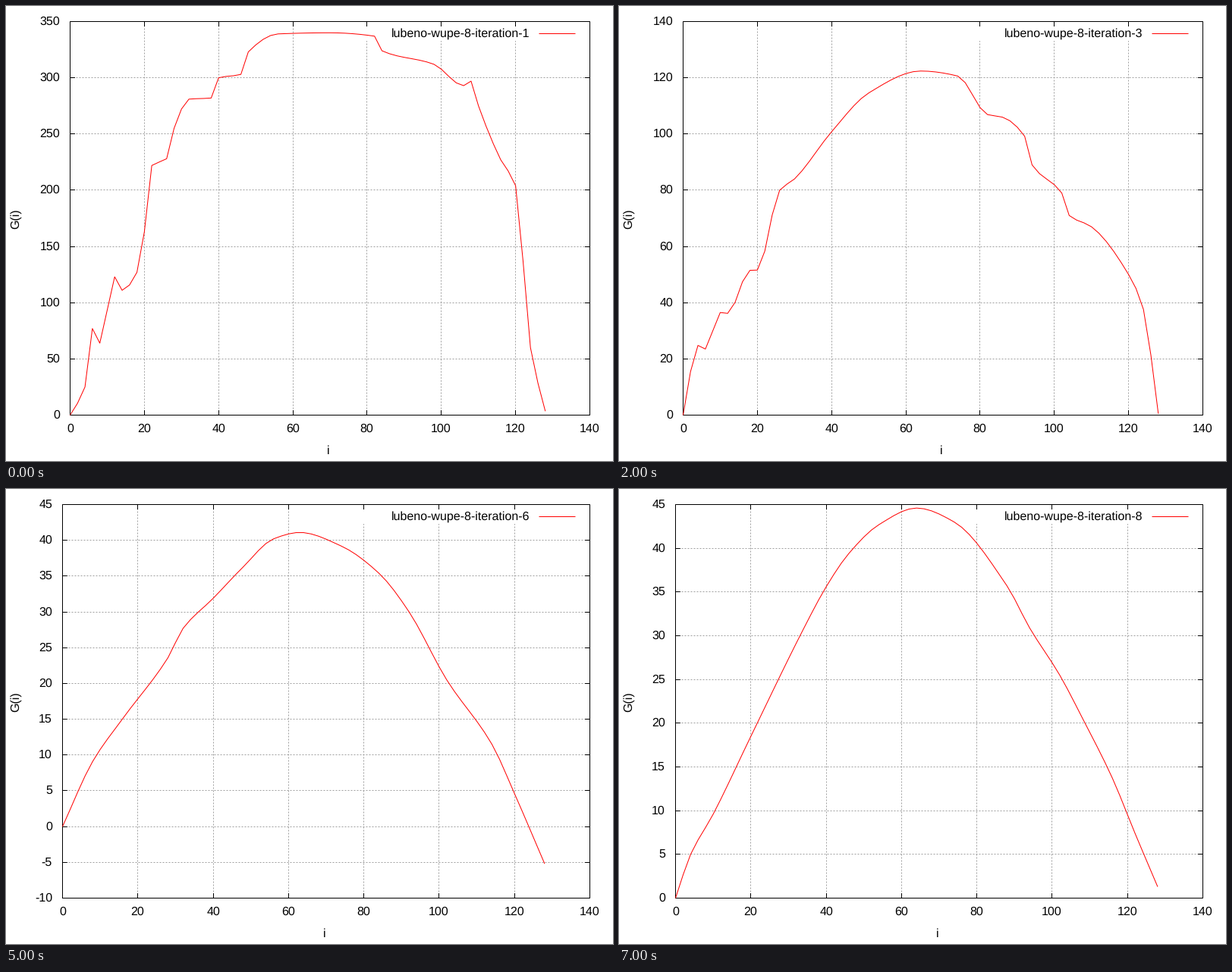
A matplotlib script for the animation above (8 s loop, 800 px wide and 600 px high).

```python
import math

import matplotlib.pyplot as plt
import numpy as np
from matplotlib.animation import FuncAnimation
from matplotlib.patches import Rectangle

plt.rcParams["font.family"] = "Liberation Sans"
plt.rcParams["text.hinting"] = "none"

PX = 0.72                      # points per pixel at 100 dpi
TOP, BOTTOM, RIGHT = 20, 539, 769
TICK = 6
STEPS = np.arange(0, 129, 2)


def curve(*points):
    """Monotone cubic through the key points, sampled at every second i."""
    x, y = np.array(points, float).T
    h = np.diff(x)
    d = np.diff(y) / h
    inner = 2 * np.maximum(d[:-1] * d[1:], 0) / (d[:-1] + d[1:] + 1e-12)
    m = np.concatenate([d[:1], inner, d[-1:]])
    k = np.clip(np.searchsorted(x, STEPS, "right") - 1, 0, len(h) - 1)
    t = (STEPS - x[k]) / h[k]
    bend = (1 - t) * (m[k] - d[k]) - t * (m[k + 1] - d[k])
    return y[k] + h[k] * t * (d[k] + (1 - t) * bend)


first = curve(
    (0, 0), (4, 25), (6, 77), (8, 64), (12, 123), (14, 111), (18, 127),
    (20, 163), (22, 222), (26, 228), (28, 255), (32, 281), (38, 282),
    (40, 300), (46, 303), (48, 323), (56, 339), (70, 340), (82, 337),
    (84, 324), (98, 312), (106, 293), (108, 297), (110, 275), (116, 227),
    (120, 204), (124, 60), (128, 3.5))
third = curve(
    (0, 0), (4, 24.8), (6, 23.5), (10, 36.5), (12, 36.2), (18, 51.5),
    (20, 51.6), (26, 80), (30, 84), (40, 100.8), (50, 114.6), (64, 122.4),
    (74, 120.6), (82, 106.9), (86, 106), (92, 99.2), (94, 89), (102, 79),
    (104, 71), (110, 67), (120, 50), (124, 37.6), (128, 0.5))
fourth = curve(
    (0, 0), (4, 7.1), (6, 7.1), (16, 22), (22, 31.5), (24, 40.3), (34, 58),
    (42, 66.3), (50, 72.2), (62, 75), (78, 73.7), (90, 66.4), (106, 52.5),
    (108, 47), (118, 37), (122, 27.3), (124, 27.9), (128, 22.2))
sixth = curve(
    (0, 0), (8, 9.1), (16, 15.1), (28, 23.6), (32, 27.7), (40, 31.9),
    (48, 36.3), (56, 40.2), (63, 41.1), (74, 39.2), (84, 35.4), (92, 30),
    (102, 20.5), (114, 11.5), (120, 4.6), (128, -5.2))
seventh = curve(
    (0, 0), (4, 8.2), (10, 14.2), (16, 19.4), (28, 27.6), (34, 31.8),
    (42, 38), (50, 41.3), (64, 44.5), (74, 42.6), (84, 36.8), (90, 33.8),
    (98, 27.7), (106, 21), (114, 11.5), (118, 8.8), (122, 2.2), (128, -2))
eighth = curve(
    (0, 0), (4, 5), (10, 9.6), (20, 18.5), (34, 30.8), (40, 35.6),
    (46, 39.4), (54, 42.7), (64, 44.6), (74, 43), (88, 35.7), (94, 30.9),
    (102, 25.5), (108, 20.6), (116, 13.7), (122, 7.4), (128, 1.3))

second = (first + third) / 2 - 75 * (STEPS / 128) ** 6
fifth = (fourth + sixth) / 2

# values, y minimum, y maximum, y step
PLOTS = [
    (first, 0, 350, 50),
    (second, -100, 250, 50),
    (third, 0, 140, 20),
    (fourth, 0, 80, 10),
    (fifth, 0, 60, 10),
    (sixth, -10, 45, 5),
    (seventh, -5, 45, 5),
    (eighth, 0, 45, 5),
]

fig = plt.figure(figsize=(8, 6), dpi=100, facecolor="white")
ax = fig.add_axes([0, 0, 1, 1])


def line(xs, ys, color="black", z=4, **style):
    ax.plot(xs, ys, color=color, lw=PX, zorder=z, snap=False, **style)


def grid(xs, ys):
    line(xs, ys, "#a0a0a0", 1, linestyle=(0, (2, 2)))


def label(x, y, text, ha="center", **style):
    ax.text(x, y, text, ha=ha, va="baseline", fontsize=16 * PX,
            color="black", zorder=5, **style)


def draw(n):
    values, low, high, step = PLOTS[n]
    left = 84 if high >= 100 else 74
    x0, x1, y0, y1 = left + 0.5, RIGHT + 0.5, BOTTOM + 0.5, TOP + 0.5

    def across(i):
        return i * (RIGHT - left) / 140

    def up(v):
        return (v - low) * (BOTTOM - TOP) / (high - low)

    ax.clear()
    ax.set_xlim(0, 800)
    ax.set_ylim(600, 0)
    ax.axis("off")

    for i in range(0, 141, 20):
        x = x0 + math.floor(across(i) + 0.5)
        if 0 < i < 140:
            grid([x, x], [y0, y1])
            line([x, x], [y0, y0 - TICK])
            line([x, x], [y1, y1 + TICK])
        label(x, 562, str(i))

    for v in range(low, high + 1, step):
        y = y0 - math.floor(up(v) + 0.5)
        if low < v < high:
            grid([x0, x1], [y, y])
            line([x0, x0 + TICK], [y, y])
            line([x1, x1 - TICK], [y, y])
        label(left - 13, y + 4.5, str(v), ha="right")

    # legend blanks the grid behind it
    ax.add_patch(Rectangle((465, 21), 304, 25, fc="white", ec="none", zorder=2))
    label(690, 41, f"lubeno-wupe-8-iteration-{n + 1}", ha="right")
    line([703, 750], [36.5, 36.5], "red")

    line([x0, x1, x1, x0, x0], [y0, y0, y1, y1, y0], solid_joinstyle="miter")
    line(x0 + across(STEPS), y0 - up(values), "red", 6, solid_capstyle="butt")

    label((left + RIGHT) / 2 - 2, 591, "i")
    label(17, 280.5, "G(i)", rotation=90, rotation_mode="anchor")


anim = FuncAnimation(fig, draw, frames=len(PLOTS), interval=1000,
                     repeat=True, repeat_delay=0)
plt.show()
```
